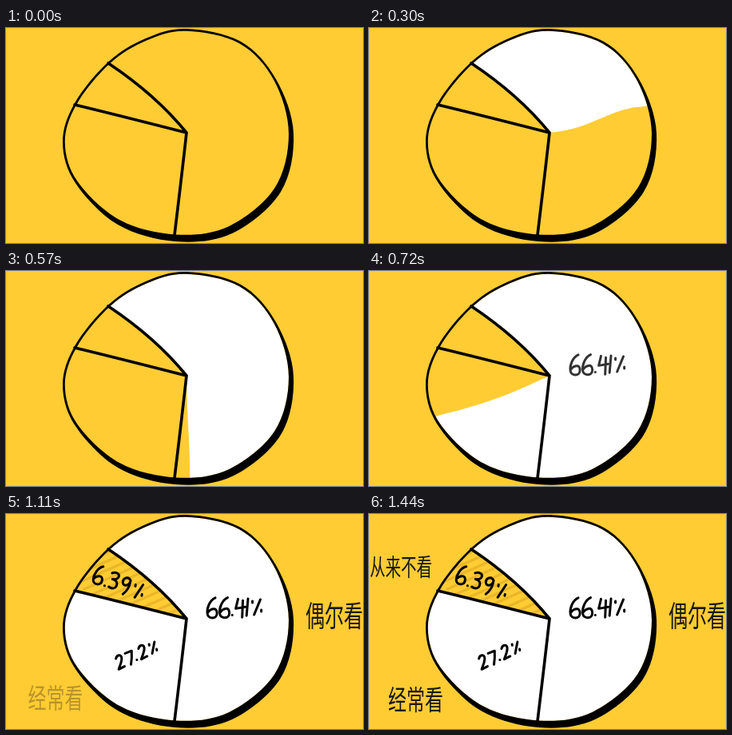
An HTML page that plays this animation: 447 by 269 pixels, repeating every 1470 ms.

```html
<!DOCTYPE html>
<html lang="zh-CN">
<head>
<meta charset="utf-8">
<title>Pie chart</title>
<style>
  html, body { margin: 0; width: 100%; height: 100%; overflow: hidden; background: #fc3; }
  svg { display: block; width: 100vw; height: 100vh; }
  path { stroke-linecap: round; stroke-linejoin: round; }
  .ink { fill: none; stroke: #000; stroke-width: 3.6; }
  .hatch { fill: none; stroke: #a87408; stroke-width: 3.5; stroke-opacity: .24; }
  text { font-family: "Noto Sans CJK SC", "Noto Sans CJK", sans-serif; fill: #181818; }
</style>
</head>
<body>
<svg viewBox="0 0 447 269">
  <defs>
    <clipPath id="disc"><path id="discPath"/></clipPath>
    <clipPath id="mostClip"><path id="mostSlice"/></clipPath>
    <clipPath id="oftenClip"><path id="oftenSlice"/></clipPath>
    <clipPath id="neverClip"><path id="neverSlice"/></clipPath>
  </defs>

  <g clip-path="url(#disc)">
    <g clip-path="url(#mostClip)"><path id="mostFill" fill="#fff"/></g>
    <g clip-path="url(#oftenClip)"><path id="oftenFill" fill="#fff"/></g>
    <g clip-path="url(#neverClip)"><path id="hatch" class="hatch"/></g>
  </g>
  <path id="rim" fill-rule="evenodd"/>
  <path id="dividers" class="ink"/>

  <g id="mostPct" role="img" aria-label="66.41%"></g>
  <g id="oftenPct" role="img" aria-label="27.2%"></g>
  <g id="neverPct" role="img" aria-label="6.39%"></g>

  <!-- tall brush lettering: one shared proportion -->
  <g id="mostLabel"><text transform="translate(375 141) scale(1 1.5)" font-size="24">偶尔看</text></g>
  <g id="oftenLabel"><text transform="translate(24 245) scale(1 1.5)" font-size="23">经常看</text></g>
  <g id="neverLabel"><text transform="translate(1 77) scale(1 1.5)" font-size="19.5">从来不看</text></g>
</svg>

<script>
const LOOP = 1470, TICK = 30;
const HUB = [226, 131], REACH = 200;
const RAD = Math.PI / 180;
const $ = id => document.getElementById(id);
const setPath = (id, d) => $(id).setAttribute('d', d);

// Smooth (Catmull-Rom) curve through points.
function smooth(pts, closed) {
  const n = pts.length;
  const at = i => closed ? pts[(i + n) % n] : pts[Math.max(0, Math.min(n - 1, i))];
  let d = 'M' + pts[0];
  for (let i = 0; i < (closed ? n : n - 1); i++) {
    const [a, b, c, e] = [at(i - 1), at(i), at(i + 1), at(i + 2)];
    d += 'C' + [0, 1].map(j => b[j] + (c[j] - a[j]) / 6)
      + ' ' + [0, 1].map(j => c[j] - (e[j] - b[j]) / 6) + ' ' + c;
  }
  return closed ? d + 'Z' : d;
}

// The rim swells toward the lower right, like a brush stroke.
const outer = [[226, 1], [294, 17], [338, 64], [360, 132], [344, 205], [283, 257], [212, 267],
  [140, 246], [87, 194], [71, 143], [86, 94], [128, 42.5], [175, 13]];
const inner = outer.map(([x, y], i) => {
  const n = outer.length, a = outer[(i + n - 1) % n], b = outer[(i + 1) % n];
  const dir = Math.atan2(b[1] - a[1], b[0] - a[0]);
  const w = 2.8 + 7 * Math.max(0, Math.cos(dir - 150 * RAD));
  return [x - w * Math.sin(dir), y + w * Math.cos(dir)];
});
const hole = smooth(inner, true);
setPath('discPath', hole);
setPath('rim', smooth(outer, true) + hole);

// Dividers: a rim end and a bend on the way to the hub.
const upper = { end: [128, 44], bend: [188, 84] };
const left = { end: [86, 96], bend: [132, 107] };
const lower = { end: [211, 259], bend: [220, 185] };
const inward = s => `M${s.end}Q${s.bend} ${HUB}`;
const slice = (a, b, far) => `${inward(a)}Q${b.bend} ${b.end}L${far}Z`;
setPath('dividers', [upper, left, lower].map(inward).join(''));
setPath('mostSlice', slice(upper, lower, '211 300H447V-20H60'));
setPath('oftenSlice', slice(lower, left, '0 75V300H211'));
setPath('neverSlice', slice(left, upper, '60 -20L0 75'));

let lines = '';
for (let i = 0; i < 14; i++) lines += `M${70 + i * 7} ${62 + i * 8}l90 -40`;
setPath('hatch', lines);

// Hand-drawn digits: advance and stroke in a 14 by 26 box.
const GLYPHS = {
  '1': [4, 'M3 3L1 24'],
  '2': [14, 'M1 6C4-1 12 0 11 7S5 19 2 25L13 22'],
  '3': [14, 'M2 3C8-1 14 3 11 8Q9 11 4 11C16 11 12 28 1 22'],
  '4': [12, 'M4 3L1 15L13 13M10 5L9 26'],
  '6': [14, 'M11 1C4 4 0 14 1 21S13 28 13 20S5 14 1 20'],
  '7': [14, 'M1 4L13 2Q11 15 7 25'],
  '9': [14, 'M12 5C8-1 1 3 2 9S11 13 12 6Q12 18 5 25'],
  '%': [14, 'M13 4L5 23M3 6v2M14 17v2'],
  '.': [3, 'M1 23h.1']
};
function write(id, x, y, angle, size, gap) {
  let pen = 0, out = '';
  for (const ch of $(id).getAttribute('aria-label')) {
    const [advance, d] = GLYPHS[ch];
    const px = x + pen * Math.cos(angle * RAD), py = y + pen * Math.sin(angle * RAD);
    out += `<path class="ink" style="stroke-width:${3 / size}" d="${d}"
      transform="translate(${px} ${py}) rotate(${angle / 2}) scale(${size})"/>`;
    pen += (advance + gap) * size;
  }
  $(id).innerHTML = out;
}
write('mostPct', 251, 104, -1, 1, 1.5);
write('oftenPct', 136, 177, -24, .72, 4);
write('neverPct', 112, 63, 22, .92, 3);

// Piecewise linear value through [time, value] stops.
function track(t, stops) {
  let [a, u] = stops[0];
  for (const [b, v] of stops) {
    if (t <= b) return b > a ? u + (v - u) * Math.max(0, t - a) / (b - a) : v;
    [a, u] = [b, v];
  }
  return u;
}
const fade = (t, from, to) => track(t, [[from, 0], [to, 1]]);

// Point at an angle clockwise from up, pushed sideways.
function polar(deg, r, side = 0) {
  const s = Math.sin(deg * RAD), c = Math.cos(deg * RAD);
  return [HUB[0] + r * s + side * c, HUB[1] - r * c + side * s];
}

// Wedge whose leading edge waves most at mid sweep.
function wedge(from, sweep, full, size, halves, length) {
  if (sweep <= 0) return '';
  const to = from + sweep, amp = size * Math.sin(Math.PI * Math.min(1, sweep / full));
  const edge = [];
  for (let r = 0; r <= length; r += length / 6)
    edge.push(polar(to, r, amp * Math.sin(halves * Math.PI * r / length)));
  let d = smooth([...edge, polar(to, REACH)]);
  for (let a = to; a > from - 20; a -= 10) d += 'L' + polar(a, REACH);
  return d + 'L' + polar(from - 20, REACH) + 'Z';
}

function show(id, alpha, dx = 0, dy = 0) {
  const rest = 1 - alpha;
  $(id).setAttribute('opacity', alpha);
  $(id).setAttribute('transform', `translate(${dx * rest} ${dy * rest})`);
}

function draw(t) {
  const most = track(t, [[30, 0], [300, 123], [330, 123], [570, 226.4], [600, 250]]);
  const often = track(t, [[600, 0], [720, 63.6], [810, 112]]);
  setPath('mostFill', wedge(-48.4, most, 235, 3, 2, 130));
  setPath('oftenFill', wedge(186.7, often, 98, -5, 1, 149));

  show('mostPct', fade(t, 600, 750));
  show('oftenPct', fade(t, 810, 980));
  show('hatch', fade(t, 810, 960));
  show('neverPct', fade(t, 915, 1095));
  show('mostLabel', fade(t, 900, 1100), -6);
  show('oftenLabel', fade(t, 1050, 1250), 5, -3);
  show('neverLabel', fade(t, 1200, 1430), 4, 3);
}

const begin = performance.now();
function frame() {
  const t = (performance.now() - begin) % LOOP;
  draw(Math.floor(t / TICK) * TICK);
  requestAnimationFrame(frame);
}
frame();
</script>
</body>
</html>
```
